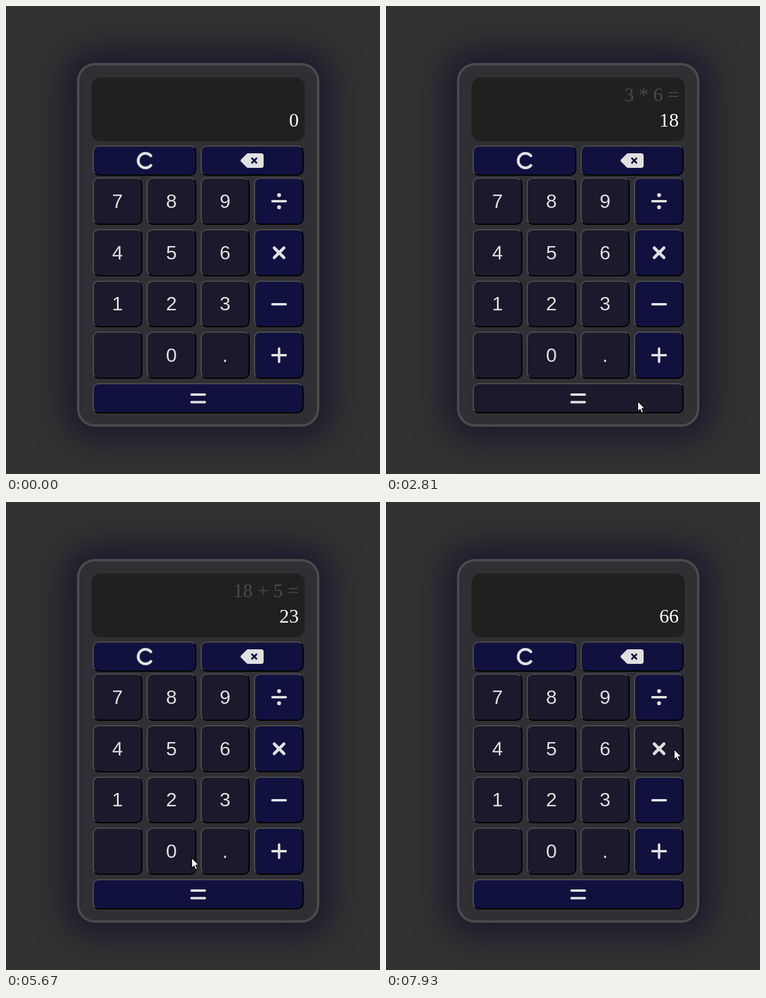
These frames come from a looping animation (617x772 px, 8 s). An HTML page:

```html
<!DOCTYPE html>
<html lang="en">
<head>
<meta charset="utf-8">
<title>Calculator</title>
<style>
html, body { margin: 0; width: 100%; height: 100%; overflow: hidden; background: #333131; }
div, button, svg { position: absolute; box-sizing: border-box; }
#body {
  left: 117px; top: 94px; width: 400px; height: 600px;
  border: 4px solid #4b4b4b; border-radius: 30px;
  background: #302f34; box-shadow: 0 0 50px 20px #1a1a2e;
}
#screen { left: 141px; top: 118px; width: 352px; height: 105px; border-radius: 15px; background: #20201f; }
button {
  margin: 0; padding: 0; border: 2px solid; border-color: #4c4c4c #000 #000 #4c4c4c; border-radius: 10px;
  background: #1a1a2c; color: #e0e0e0; font: 32px "Liberation Sans", Arial, sans-serif;
}
button.op, button.hover { background: #111140; }
button.op.hover { background: #1a1a2c; }
button.down { border-color: #000 #4c4c4c #4c4c4c #000; }
svg { left: 0; top: 0; pointer-events: none; }
text { font: 32px "Liberation Serif", "Times New Roman", serif; text-anchor: end; }
.icon { fill: none; stroke: #e0e0e0; stroke-width: 4; stroke-linecap: round; }
</style>
</head>
<body>
<div id="body"></div>
<div id="screen"></div>
<div id="keys"></div>
<svg width="617" height="772">
  <text id="past" x="483" y="157" fill="#4b4b4b"></text>
  <text id="now" x="483" y="199" fill="#fff"></text>
  <g class="icon">
    <path stroke-width="4.6" d="M239 247A12 12 0 1 0 239 263"/>
    <path d="M439.500 322h22M439.500 492h22M439.500 576h22M450.500 565v22M306 641h22M306 653.500h22"/>
    <path stroke-width="5" d="M442.500 399l16 16m0-16l-16 16"/>
    <path stroke-width="6.400" d="M450.500 312h.01M450.500 332h.01"/>
  </g>
  <path fill="#e0e0e0" d="M400 243h21q4 0 4 4v16q0 4-4 4h-21q-2 0-3-1l-9-9q-2-2 0-4l9-9q1-1 3-1z"/>
  <path stroke="#111140" stroke-width="3" d="M405 250.500l9 9m0-9l-9 9"/>
  <path id="cursor" fill="#fff" stroke="#000" d="M0 0v16l3.700-3.500 2.600 6 2.600-1.100-2.600-6h5z"/>
</svg>
<script>
const $ = id => document.getElementById(id);
const keys = [];

function addKey(label, left, top, right, bottom, op) {
  const el = document.createElement('button');
  el.textContent = label;
  el.style.cssText = `left:${left}px;top:${top}px;width:${right - left}px;height:${bottom - top}px`;
  if (op) el.className = 'op';
  $('keys').append(el);
  keys.push({ el, left, top, right, bottom });
}

const cols = [[143, 225], [232, 314], [321, 402], [409, 491]];
const rows = [[283, 361], [368, 446], [453, 530], [537, 615]];
addKey('', 143, 230, 314, 280, true);
addKey('', 321, 230, 491, 280, true);
['789', '456', '123', ' 0.'].forEach((line, r) => cols.forEach(([left, right], c) =>
  addKey(line[c] || '', left, rows[r][0], right, rows[r][1], c === 3)));
addKey('', 143, 622, 491, 672, true);

// Cursor moves: start, end, x, y reached
const moves = [
  [0, 0, 577, 758],
  [130, 720, 370, 492],
  [1030, 1290, 450, 416],
  [1430, 1700, 354, 430],
  [1850, 2100, 415, 652],
  [2810, 3110, 432, 578],
  [3300, 3770, 275, 394],
  [4350, 4650, 318, 653],
  [5520, 6100, 246, 261],
  [7140, 7400, 364, 412],
  [7710, 7930, 475, 408]
];

// Display states: time, upper line, lower line
const states = [
  [0, '', '0'],
  [820, '', '3'],
  [1400, '', '3 *'],
  [1810, '', '3 * 6'],
  [2300, '3 * 6 =', '18'],
  [3240, '', '18 +'],
  [4310, '', '18 + 5'],
  [5050, '18 + 5 =', '23'],
  [6800, '', '0'],
  [7520, '', '6'],
  [7700, '', '66']
];

const LOOP = 8000, PRESS = 60, HOVER_LAG = 50;

function cursorAt(t) {
  let [, , x, y] = moves[0];
  for (const [start, end, toX, toY] of moves.slice(1)) {
    if (t < start) break;
    const u = Math.min(1, (t - start) / (end - start)), s = u * u * (3 - 2 * u);
    x += (toX - x) * s;
    y += (toY - y) * s;
  }
  return [x, y];
}

function draw(t) {
  const [x, y] = cursorAt(t), [hx, hy] = cursorAt(t - HOVER_LAG);
  $('cursor').setAttribute('transform', `translate(${Math.round(x) + 0.5} ${Math.round(y) + 0.5})`);
  $('cursor').style.display = t < 130 ? 'none' : '';

  const pressed = states.some(([at]) => at > t && at - PRESS <= t);
  for (const k of keys) {
    const hover = hx >= k.left && hx < k.right && hy >= k.top && hy < k.bottom;
    k.el.classList.toggle('hover', hover);
    k.el.classList.toggle('down', hover && pressed);
  }

  const [, past, now] = states.filter(([at]) => at <= t).pop();
  $('past').textContent = past;
  $('now').textContent = now;
}

const begin = performance.now();
function tick() {
  draw((performance.now() - begin) % LOOP);
  requestAnimationFrame(tick);
}
tick();
</script>
</body>
</html>
```
